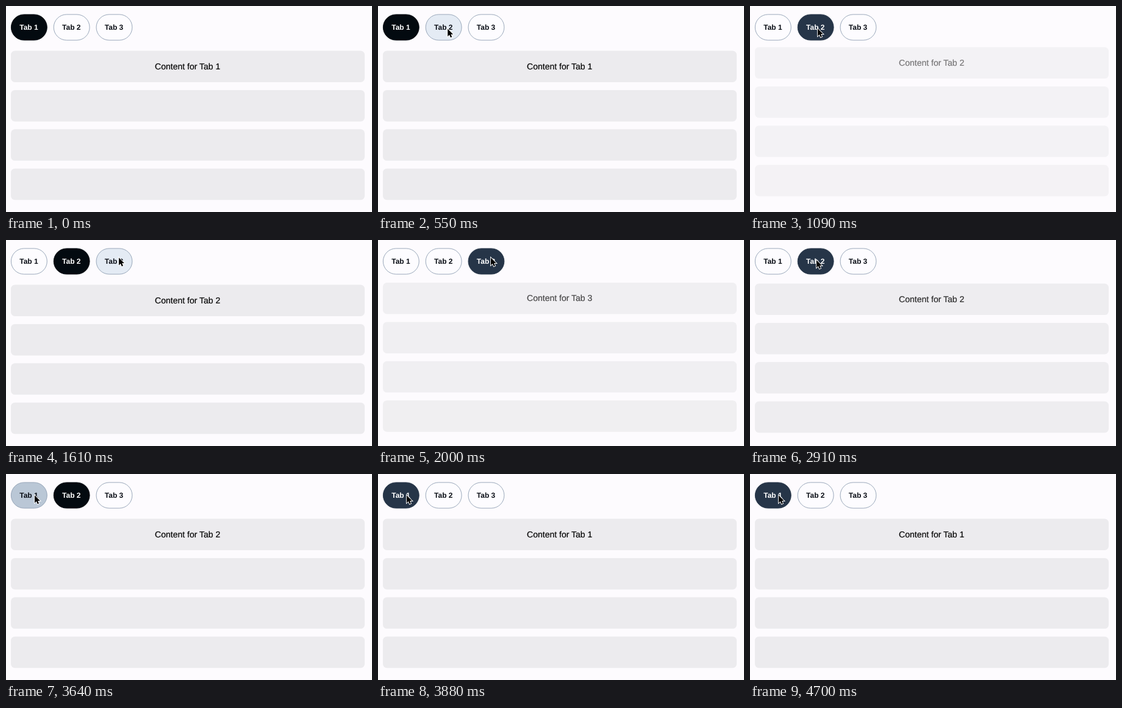
Recreate the animation shown at these times as an HTML page. Size 600 px wide and 338 px high, loop 4880 ms.

```html
<!DOCTYPE html>
<html lang="en">
<head>
<meta charset="utf-8">
<title>Tabs</title>
<style>
  html, body { margin: 0; width: 100%; height: 100%; overflow: hidden; background: #fdfbfe; }
  svg { display: block; width: 600px; height: 338px; font-family: "Liberation Sans", Arial, sans-serif; text-anchor: middle; text-rendering: geometricPrecision; }
  .tab text { font-size: 12px; font-weight: bold; }
  #label { font-size: 14px; fill: #050505; stroke: #050505; stroke-width: 0.2px; }
  #panel rect { fill: #ecebee; }
</style>
</head>
<body>
<svg viewBox="0 0 600 338">
  <g id="tabs"></g>
  <g id="panel"><text id="label" x="297.7" y="104"></text></g>
  <path id="cursor" d="M0 0V12.4L2.8 9.8L4.8 14.2L7 13.2L5.1 9H8.9Z" fill="#000" stroke="#fff" stroke-width="1.8" paint-order="stroke"/>
</svg>
<script>
const LOOP = 4880, FADE = 200, GLIDE = 370, HOLD = 88, DROP = 13;
const TAB = { x: 8, y: 13.5, w: 59.7, h: 43, pitch: 69.8 };
const COLORS = { idle: '#fdfcff', hover: '#e4ebf4', press: '#bac7d6', active: '#030a10', activeHover: '#263548' };

// The cursor glides to each tab in turn, then presses and releases it at a steady pace.
const ENTRY = { x: 129, y: 40 };
const visits = [
  { tab: 1, move: 390, x: 111, y: 37 },
  { tab: 2, move: 1250, x: 185, y: 29 },
  { tab: 1, move: 2250, x: 109, y: 33 },
  { tab: 0, move: 3250, x: 47, y: 35 }
].map((visit, i) => ({ ...visit, release: 1028 + 886 * i }));

const $ = id => document.getElementById(id);
function set(el, attrs) {
  for (const key in attrs) el.setAttribute(key, attrs[key]);
  return el;
}
function add(parent, name, attrs) {
  return set(parent.appendChild(document.createElementNS('http://www.w3.org/2000/svg', name)), attrs);
}

const tabs = [0, 1, 2].map(i => {
  const x = TAB.x + i * TAB.pitch;
  const group = add($('tabs'), 'g', { class: 'tab' });
  const pill = add(group, 'rect', {
    x: x + 0.4, y: TAB.y + 0.4, width: TAB.w - 0.8, height: TAB.h - 0.8, rx: 21.1, 'stroke-width': 0.9
  });
  const text = add(group, 'text', { x: x + TAB.w / 2 - 0.4, y: 39.4 });
  text.textContent = `Tab ${i + 1}`;
  return { x, pill, text };
});

for (let i = 0; i < 4; i++) {
  const tile = add($('panel'), 'rect', { x: 8, y: 73.5 + i * 64.4, width: 580, height: 51.5, rx: 6.5 });
  $('panel').prepend(tile);
}

const clamp = u => Math.min(1, Math.max(0, u));
const easeOut = u => 1 - (1 - clamp(u)) ** 3;

// cubic-bezier(.25, .1, .25, 1), solved by bisection
function ease(x) {
  const curve = (a, b, s) => 3 * a * s * (1 - s) ** 2 + 3 * b * s * s * (1 - s) + s ** 3;
  let lo = 0, hi = 1;
  for (let i = 0; i < 20; i++) {
    const mid = (lo + hi) / 2;
    if (curve(0.25, 0.25, mid) < x) lo = mid; else hi = mid;
  }
  return curve(0.1, 1, hi);
}

function cursorAt(t) {
  if (t < visits[0].move) return null;
  return visits.reduce((from, to) => {
    const s = easeOut((t - to.move) / GLIDE);
    return { x: from.x + (to.x - from.x) * s, y: from.y + (to.y - from.y) * s };
  }, ENTRY);
}

function draw(t) {
  const cursor = cursorAt(t);
  const last = visits.filter(v => t >= v.release).pop();
  const active = last ? last.tab : 0;
  const shown = last ? ease(clamp((t - last.release) / FADE)) : 1;
  const pressing = visits.find(v => t >= v.release - HOLD && t < v.release);

  tabs.forEach(({ x, pill, text }, i) => {
    const hover = cursor && cursor.x >= x && cursor.x <= x + TAB.w;
    const on = i === active;
    const state = on ? (hover ? 'activeHover' : 'active')
      : pressing && pressing.tab === i ? 'press' : hover ? 'hover' : 'idle';
    set(pill, { fill: COLORS[state], stroke: on ? COLORS[state] : '#8f9fb3' });
    set(text, { fill: on ? '#fff' : '#0b0f17' });
  });

  $('label').textContent = `Content for Tab ${active + 1}`;
  set($('panel'), { opacity: shown, transform: `translate(0 ${-DROP * (1 - shown)})` });
  set($('cursor'), { visibility: cursor ? 'visible' : 'hidden' });
  if (cursor) set($('cursor'), { transform: `translate(${cursor.x} ${cursor.y})` });
}

const start = performance.now();
function tick() {
  draw((performance.now() - start) % LOOP);
  requestAnimationFrame(tick);
}
tick();
</script>
</body>
</html>
```
